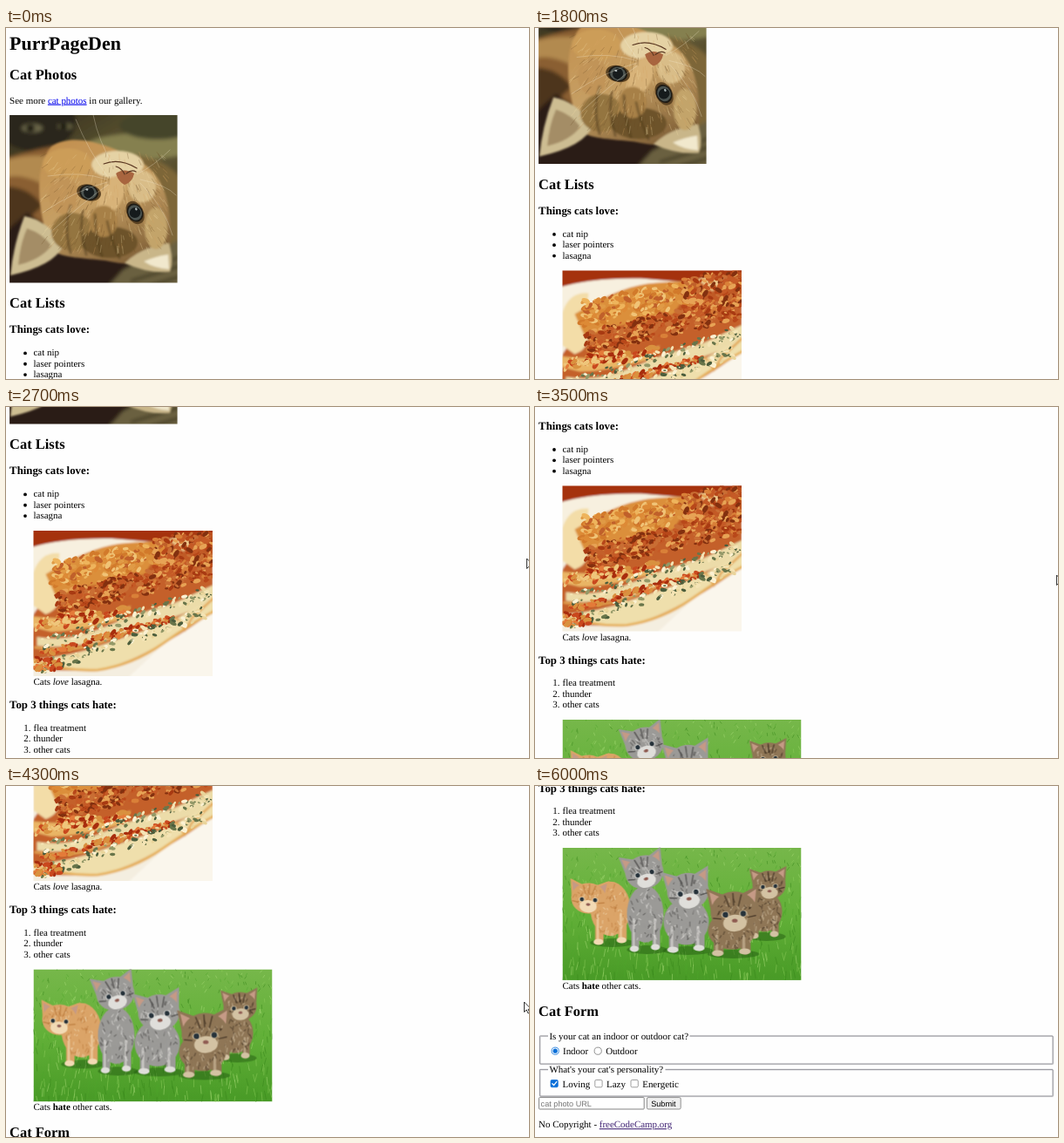
Animation of 600x403 px, one loop 6.9 s. Source, as an HTML page:

```html
<!DOCTYPE html>
<html lang="en">
<head>
<meta charset="utf-8">
<title>Cat page</title>
<style>
  html, body { margin: 0; width: 100%; height: 100%; overflow: hidden; background: #fefefe; }
  svg { display: block; width: 100vw; height: 100vh; }
  text { font-family: "Liberation Serif", "Times New Roman", serif; font-size: 10.96px; text-rendering: geometricPrecision; }
  .h1 { font-size: 21.92px; font-weight: bold; }
  .h2 { font-size: 16.44px; font-weight: bold; }
  .h3 { font-size: 12.82px; font-weight: bold; }
  .ui { font-family: "Liberation Sans", Arial, sans-serif; font-size: 9.13px; }
  .link { fill: #0000ee; text-decoration: underline; }
  .seen { fill: #3f2273; text-decoration: underline; }
  .b { font-weight: bold; }
  .i { font-style: italic; }
</style>
</head>
<body>
<svg id="stage" viewBox="0 0 600 403" preserveAspectRatio="none"></svg>
<script>
const LOOP = 6900, TICK = 100;
const stage = document.getElementById('stage');

// ---- small drawing helpers ----
function seeded(seed) {
  return () => (seed = (seed * 16807) % 2147483647) / 2147483647;
}
const fix = n => +n.toFixed(2);
const path = (d, fill, extra = '') => `<path d="${d}" fill="${fill}" ${extra}/>`;
const line = (d, color, width, extra = '') =>
  `<path d="${d}" fill="none" stroke="${color}" stroke-width="${fix(width)}" stroke-linecap="round" ${extra}/>`;
const oval = (x, y, rx, ry, fill, extra = '') =>
  `<ellipse cx="${fix(x)}" cy="${fix(y)}" rx="${fix(rx)}" ry="${fix(ry)}" fill="${fill}" ${extra}/>`;
const box = (x, y, w, h, fill, extra = '') =>
  `<rect x="${x}" y="${y}" width="${w}" height="${h}" fill="${fill}" ${extra}/>`;
const text = (x, y, str, cls = '') => `<text x="${x}" y="${y}" class="${cls}">${str}</text>`;
const span = (cls, str) => `<tspan class="${cls}">${str}</tspan>`;
const repeat = (n, fn) => Array.from({ length: n }, (_, i) => fn(i)).join('');
const pick = (rnd, list) => list[Math.floor(rnd() * list.length)];
const soften = (id, art) => `<g filter="url(#${id})">${art}</g>`;
const gradient = (id, dir, ...colors) =>
  `<linearGradient id="${id}" ${dir}>` +
  colors.map((c, i) => `<stop offset="${fix(i / (colors.length - 1))}" stop-color="${c}"/>`).join('') +
  '</linearGradient>';
const blur = (id, s) =>
  `<filter id="${id}" x="-10%" y="-10%" width="120%" height="120%"><feGaussianBlur stdDeviation="${s}"/></filter>`;
const photo = (x, y, w, h, art) =>
  `<svg x="${x}" y="${y}" width="${w}" height="${h}" viewBox="0 0 ${w} ${h}" overflow="hidden">${art}</svg>`;

// ---- pictures ----
function sleepyKitten() {
  const rnd = seeded(11);
  const room =
    box(-10, -10, 215, 215, 'url(#room)') +
    oval(30, 8, 46, 34, '#2b271a') + oval(26, 15, 12, 5, '#6b6648') + oval(64, 13, 9, 4, '#605b3e') +
    oval(24, 15, 5, 4, '#191610') + oval(62, 13, 4, 4, '#191610') +
    oval(150, 36, 62, 15, '#85804f') + oval(170, 12, 44, 16, '#45452c') +
    path('M-5 50Q30 38 66 34V118L30 134-5 124Z', '#8a5f30') +
    path('M-5 52Q22 44 50 48L36 78Q10 66-5 72Z', '#b28a50') +
    path('M-5 82Q22 82 38 104L10 130H-5Z', '#4d351b') +
    path('M142 45Q185 52 200 78V150H165Z', '#7d6639') +
    path('M-5 134 20 112 60 140 140 168 135 200H-5Z', '#2b1f12') +
    path('M130 178 200 140V200H110Z', '#6a6140') +
    line('M140 190 200 172M160 196 200 184M184 168 200 160', '#37311c', 2.5);
  const head =
    path('M48 36C75 18 118 36 148 52C180 70 187 108 184 152C168 172 140 174 110 167C84 164 62 164 50 156C30 112 28 58 48 36Z', 'url(#fur)') +
    path('M1 184Q4 150 17 116Q42 120 62 148Q54 172 1 184Z', '#cdbd92') +
    path('M10 172Q12 148 20 130Q38 136 48 150Q36 166 10 172Z', '#a48d66') +
    path('M132 170Q150 152 183 147Q189 168 184 180Q158 182 132 170Z', '#c9b689') +
    path('M154 168Q168 162 182 160L183 177Q166 176 154 168Z', '#f1e8cd') +
    oval(66, 56, 28, 18, '#cc9d59') + oval(124, 57, 30, 16, '#e5d2a4') + oval(152, 82, 16, 18, '#d9bd88') +
    oval(62, 92, 17, 22, '#c19458') +
    oval(117, 92, 13, 24, '#d8b379', 'transform="rotate(25 117 92)"') +
    oval(72, 134, 24, 22, '#94743f') + oval(115, 146, 32, 18, '#6d5329') + oval(108, 122, 16, 18, '#a78047') +
    oval(168, 130, 13, 24, '#c3a46a');
  const stripes = line('M70 104Q62 130 70 158M84 110Q80 135 88 160M98 114Q98 136 106 162M112 122Q116 142 126 164', '#4f3a1c', 3, 'opacity=".5"');
  const fur = repeat(360, () => {
    const x = 42 + rnd() * 136, y = 42 + rnd() * 112;
    const dx = (x - 120) / 12, dy = 3 + rnd() * 6;
    return line(`M${fix(x)} ${fix(y)}l${fix(dx)} ${fix(dy)}`, pick(rnd, ['#f0d9a4', '#6d4c25', '#d2a260']), .7, 'opacity=".4"');
  });
  const eye = (x, y, tilt) => `<g transform="translate(${x} ${y}) rotate(${tilt})">` +
    oval(0, 0, 14, 9.5, '#5b4222') + oval(0, 0, 11, 8.8, '#1d1a14') + oval(0, 0, 9, 7.6, '#4b5350') +
    oval(0, 0, 6, 6.4, '#161b1c') + oval(-3, -3, 1.6, 1.2, '#a9b4b5') + '</g>';
  const face = eye(91, 89, 12) + eye(144, 112, 62) +
    path('M122 67Q131 60 143 67Q141 77 132 80Q125 77 122 67Z', '#a8653f') +
    line('M132 68Q129 61 122 59M134 67Q140 62 145 65M108 56Q126 49 146 61', '#5b3822', 1.2);
  const whiskers = line('M112 74Q82 64 44 70M112 77Q76 86 38 112M113 80Q84 100 50 132M112 70Q90 40 76 5M120 60Q102 30 96 0M146 68Q166 58 184 40M150 74Q180 80 191 92M150 78Q178 106 187 138', '#f6ecd3', .5, 'opacity=".6"');
  return soften('blur2', room) + soften('blur1', head + stripes) + fur + soften('blur05', face) + whiskers;
}

function lasagna() {
  const rnd = seeded(29);
  const bits = (n, x0, x1, yAt, spread, colors, size) => repeat(n, () => {
    const x = x0 + rnd() * (x1 - x0), y = yAt(x) + (rnd() - .5) * spread;
    const s = size * (.4 + rnd());
    return oval(x, y, s * 1.8, s, pick(rnd, colors),
      `transform="rotate(${Math.round(rnd() * 110 - 70)} ${fix(x)} ${fix(y)})"`);
  });
  const base =
    box(-5, -5, 216, 178, '#f4eee0') + box(-5, -5, 216, 28, '#a5320f') +
    path('M-5 20Q30 8 90 9L150 14 70 38-5 50Z', '#f7f0df') +
    path('M150 130 211 92V172H105Z', '#faf6ec') +
    path('M0 96 30 52 150 36 206 10V92Q176 116 148 130Q110 158 72 160Q34 162-5 158Z', '#c4602b') +
    path('M-5 98Q40 104 84 96L112 86 100 102Q50 116 20 116L-5 110Z', '#e9b565') +
    path('M4 122Q42 128 78 112Q120 94 160 84L211 60V76Q186 92 152 102Q108 116 72 128Q32 136 4 132Z', '#ecdca9') +
    path('M-5 148Q40 146 82 130Q130 114 158 104Q186 88 211 74V92Q176 108 150 128Q108 154 72 160Q28 158-5 156Z', '#efdfac') +
    line('M-3 148Q36 162 74 160Q114 154 148 130T208 92', '#e6b05a', 3) +
    line('M2 134Q48 142 88 124T164 100L174 114 182 100 206 78', '#e2a552', 2.5) +
    path('M0 48Q8 24 30 26L26 64Q36 88 14 96L0 86Z', '#f3dda8') +
    path('M14 50Q62 20 98 15Q145 10 174 16L140 46 100 58 60 64 26 76Z', '#db8f3a') +
    path('M150 18Q176 4 211 0V36L160 50 128 48Z', '#c05a28') +
    path('M154 10Q172 4 186 10L172 24Z', '#ecc688');
  const crust = ['#eeb45c', '#d27a2b', '#f0c376', '#c0602a', '#e09a45', '#dd8a36'];
  const meat = ['#a83a12', '#c55a26', '#d98038', '#83300f', '#e7a355', '#c96e34', '#b8481a'];
  const herbs = ['#68754a', '#949968', '#4b5d3c', '#fbf1d2', '#e9d49a', '#f4e4b5'];
  const sauce = ['#a82d0d', '#c9481e', '#e47b39', '#d9913f'];
  const details =
    bits(230, 22, 150, x => 54 - x * .19, 30, crust, 2.2) +
    bits(150, 140, 206, x => 42 - x * .12, 36, meat, 2) +
    bits(420, 26, 206, x => 90 - x * .24, 28, meat, 1.9) +
    bits(90, 2, 110, x => 108 - x * .14, 12, [...sauce, '#efc67b'], 2.2) +
    bits(130, 10, 204, x => 133 - x * .31, 13, herbs, 1.5) +
    bits(110, 4, 160, x => 145 - x * .28, 7, sauce, 1.8) +
    bits(140, 8, 200, x => 161 - x * .34, 14, herbs, 1.5) +
    bits(30, 0, 30, () => 154, 12, sauce, 2.2);
  return soften('blur1', base) + soften('blur05', details);
}

function kittens() {
  const rnd = seeded(47);
  const grass = box(0, 0, 274, 152, 'url(#lawn)') + repeat(700, () => {
    const y = rnd() * 158, len = 2 + y / 20;
    return line(`M${fix(rnd() * 274)} ${fix(y)}l${fix((rnd() - .5) * 5)} ${fix(-len)}`,
      pick(rnd, ['#35851a', '#8fcf5c', '#4fa52b', '#a9dc78']), .9, 'opacity=".55"');
  });
  const hairs = (n, x, y, rx, ry, colors) => repeat(n, () => {
    const a = rnd() * 2 * Math.PI, d = Math.sqrt(rnd()) * .92;
    return line(`M${fix(x + Math.cos(a) * d * rx)} ${fix(y + Math.sin(a) * d * ry)}l${fix((rnd() - .5) * 5)} ${fix(1 + rnd() * 4)}`,
      pick(rnd, colors), 1.1, 'opacity=".6"');
  });
  // hx, hy, r: head; bx, by, bw, bh: body; lean: head tilt
  function cat({ hx, hy, r, bx, by, bw, bh, lean, coat, pale, dark }) {
    const foot = by + bh;
    const leg = (x, y) => line(`M${fix(x)} ${by}L${fix(x)} ${fix(y - 4)}`, coat, bw * .42) +
      line(`M${fix(x - bw * .08)} ${by + 6}V${fix(y - 5)}`, pale, bw * .12, 'opacity=".6"') +
      oval(x - 1, y - 2, bw * .25, 3.6, pale);
    const body = oval(bx + 2, foot - 1, bw * 1.1, 5, '#245d12', 'opacity=".5"') +
      oval(bx, by, bw, bh * .78, coat) + leg(bx - bw * .55, foot) + leg(bx + bw * .6, foot - 2) +
      hairs(90, bx, by, bw, bh * .8, [pale, dark, coat]);
    const ear = s => path(`M${fix(s * r * .28)} ${fix(-r * .72)}L${fix(s * r * 1.12)} ${fix(-r * 1.08)}L${fix(s * r * .98)} ${fix(-r * .1)}Z`, coat) +
      path(`M${fix(s * r * .52)} ${fix(-r * .66)}L${fix(s * r * 1.0)} ${fix(-r * .92)}L${fix(s * r * .9)} ${fix(-r * .3)}Z`, '#c59a86');
    const eye = s => oval(s * r * .38, r * .08, r * .17, r * .14, pale) + oval(s * r * .38, r * .08, r * .12, r * .12, '#26323a');
    const mark = s => `M${fix(s * r * .35)} ${fix(-r * .72)}L${fix(s * r * .2)} ${fix(-r * .25)}` +
      `M${fix(s * r * .9)} ${fix(r * .2)}L${fix(s * r * .58)} ${fix(r * .25)}`;
    const head = ear(-1) + ear(1) + oval(0, 0, r, r * .88, coat) +
      hairs(50, 0, -r * .1, r * .9, r * .7, [pale, dark, coat]) +
      oval(0, r * .46, r * .5, r * .36, pale) +
      line(`M0 ${fix(-r * .8)}V${fix(-r * .3)}` + mark(-1) + mark(1), dark, 1.5, 'opacity=".75"') +
      eye(-1) + eye(1) + oval(0, r * .36, r * .12, r * .08, '#8f5c52');
    return body + `<g transform="translate(${hx} ${hy}) rotate(${lean})">${head}</g>`;
  }
  const ginger = { coat: '#dba468', pale: '#f2dab4', dark: '#bd7c3e' };
  const grey = { coat: '#9b9a97', pale: '#dfdeda', dark: '#474644' };
  const brown = { coat: '#8f7656', pale: '#d3c2a3', dark: '#3f3022' };
  return grass + soften('blur05', [
    { hx: 237, hy: 43, r: 19, bx: 232, by: 73, bw: 20, bh: 30, lean: -4, ...brown },
    { hx: 30, hy: 58, r: 20, bx: 55, by: 70, bw: 23, bh: 40, lean: 4, ...ginger },
    { hx: 94, hy: 28, r: 22, bx: 95, by: 76, bw: 21, bh: 42, lean: -14, ...grey },
    { hx: 144, hy: 50, r: 24, bx: 142, by: 85, bw: 26, bh: 34, lean: -8, ...grey },
    { hx: 197, hy: 74, r: 27, bx: 194, by: 95, bw: 27, bh: 28, lean: -4, ...brown }
  ].map(cat).join(''));
}

// ---- page ----
const bullet = (y, str) => oval(22, y - 2.9, 1.9, 1.9, '#000') + text(31.5, y, str);
const item = (n, y, str) => text(20.2, y, n + '.') + text(31.5, y, str);

function fieldset(top, bottom, gap, legend) {
  const frame = (d, color) =>
    `<rect x="${5.4 + d}" y="${top + d}" width="588.6" height="${bottom - top}" rx=".5" fill="none" stroke="${color}" stroke-width=".75"/>`;
  return frame(.7, '#c4c4c8') + frame(0, '#75757c') +
    box(15, top - 4, gap - 15, 8, '#fefefe') + text(16.4, top + 3.7, legend);
}
const radio = (x, y, on) => `<circle cx="${x}" cy="${y}" r="4.1" fill="#fff" stroke="${on ? '#0b6fd8' : '#767676'}" stroke-width=".8"/>` +
  (on ? oval(x, y, 2.6, 2.6, '#0b6fd8') : '');
const check = (x, y, on) => box(x, y, 8.3, 8.3, on ? '#0b6fd8' : '#fff', `rx="1.4" stroke="${on ? '#0b6fd8' : '#767676'}" stroke-width=".7"`) +
  (on ? line(`M${x + 1.8} ${y + 4.3}l1.8 1.8 3.2-4`, '#fff', 1.3) : '');

const form =
  fieldset(286.9, 319, 177.5, 'Is your cat an indoor or outdoor cat?') +
  radio(23.2, 304.2, true) + text(32, 308.4, 'Indoor') +
  radio(72.2, 304.2, false) + text(81.2, 308.4, 'Outdoor') +
  fieldset(325.4, 356, 149.5, "What's your cat's personality?") +
  check(18, 337.5, true) + text(31.5, 346.2, 'Loving') +
  check(68.8, 337.5, false) + text(82, 346.2, 'Lazy') +
  check(110, 337.5, false) + text(123.2, 346.2, 'Energetic') +
  box(4.6, 357.6, 120.6, 13.4, '#fff', 'rx=".8" stroke="#767676" stroke-width=".9"') +
  `<g fill="#757575">${text(6.6, 367.6, 'cat photo URL', 'ui')}</g>` +
  box(128.4, 357.6, 38.8, 13.4, '#efefef', 'rx="1.6" stroke="#767676" stroke-width=".8"') +
  text(133.2, 367.6, 'Submit', 'ui') +
  text(4.1, 392.2, 'No Copyright - ' + span('seen', 'freeCodeCamp.org'));

const END = 612.5;
const page =
  text(4.1, 25, 'PurrPageDen', 'h1') +
  text(4.1, 59.2, 'Cat Photos', 'h2') +
  text(4.1, 86.5, 'See more ' + span('link', 'cat photos') + ' in our gallery.') +
  photo(4.1, 100, 192.5, 192.5, sleepyKitten()) +
  text(4.1, 321.1, 'Cat Lists', 'h2') +
  text(4.1, 350.2, 'Things cats love:', 'h3') +
  ['cat nip', 'laser pointers', 'lasagna'].map((s, i) => bullet(376.3 + i * 12.35, s)).join('') +
  photo(31.5, 415, 205.5, 167, lasagna()) +
  text(31.5, 592, 'Cats ' + span('i', 'love') + ' lasagna.') +
  text(4.1, 619.3, 'Top 3 things cats hate:', 'h3') +
  ['flea treatment', 'thunder', 'other cats'].map((s, i) => item(i + 1, 644.8 + i * 12.35, s)).join('') +
  photo(31.5, 683.4, 274, 152.2, kittens()) +
  text(31.5, 845.2, 'Cats ' + span('b', 'hate') + ' other cats.') +
  text(4.1, 876.2, 'Cat Form', 'h2') +
  `<g transform="translate(0 ${END})">${form}</g>`;

stage.innerHTML = '<defs>' +
  gradient('room', 'x2=".6" y2="1"', '#2a2417', '#625a35', '#43361f') +
  gradient('fur', 'x1=".2" x2=".7" y2="1"', '#c39150', '#c69f64', '#806037') +
  gradient('lawn', 'x2="0" y2="1"', '#76b74a', '#62b038', '#489a26') +
  blur('blur2', 2) + blur('blur1', 1) + blur('blur05', .45) + '</defs>' +
  box(0, 0, 600, 403, '#fefefe') + `<g id="page">${page}</g>` +
  '<path id="pointer" d="M0 0V11.5L2.7 9 4.5 13 6.3 12.2 4.6 8.3H8.2Z" fill="#fff" stroke="#000" stroke-width=".8"/>';

// ---- motion: the scrollbar is dragged, the pointer follows it ----
const scrollKeys = [[700, 0], [1800, 136.5], [2700, 273], [3500, 324.4], [4300, 473], [5000, 539.5], [5600, END]];
const pointerKeys = [[2100, 603], [2700, 597.5], [3500, 598.5], [4300, 594.5], [5000, 597.8], [5600, 603]];

const slope = (k, i) => (k[i + 1][1] - k[i][1]) / (k[i + 1][0] - k[i][0]);

function tangent(k, i) {
  if (i === 0) return slope(k, 0) * .5;
  if (i === k.length - 1) return slope(k, i - 1);
  const a = slope(k, i - 1), b = slope(k, i);
  return a * b > 0 ? 2 * a * b / (a + b) : 0;
}

function along(k, t) {
  const last = k.length - 1;
  if (t <= k[0][0]) return k[0][1];
  if (t >= k[last][0]) return k[last][1];
  const i = k.findIndex(p => p[0] > t) - 1;
  const [t0, a] = k[i], [t1, b] = k[i + 1];
  const d = t1 - t0, u = (t - t0) / d, v = 1 - u;
  return a * (1 + 2 * u) * v * v + b * u * u * (3 - 2 * u) +
    d * u * v * (tangent(k, i) * v - tangent(k, i + 1) * u);
}

const pageEl = document.getElementById('page');
const pointerEl = document.getElementById('pointer');

function update(ms) {
  const t = Math.floor(ms % LOOP / TICK) * TICK;
  const y = along(scrollKeys, t);
  pageEl.setAttribute('transform', `translate(0 ${fix(-y)})`);
  pointerEl.setAttribute('transform', `translate(${fix(along(pointerKeys, t))} ${fix(174 + (y - 273) * .37)})`);
}

const start = performance.now();
function loop() {
  update(performance.now() - start);
  requestAnimationFrame(loop);
}
loop();
</script>
</body>
</html>
```
